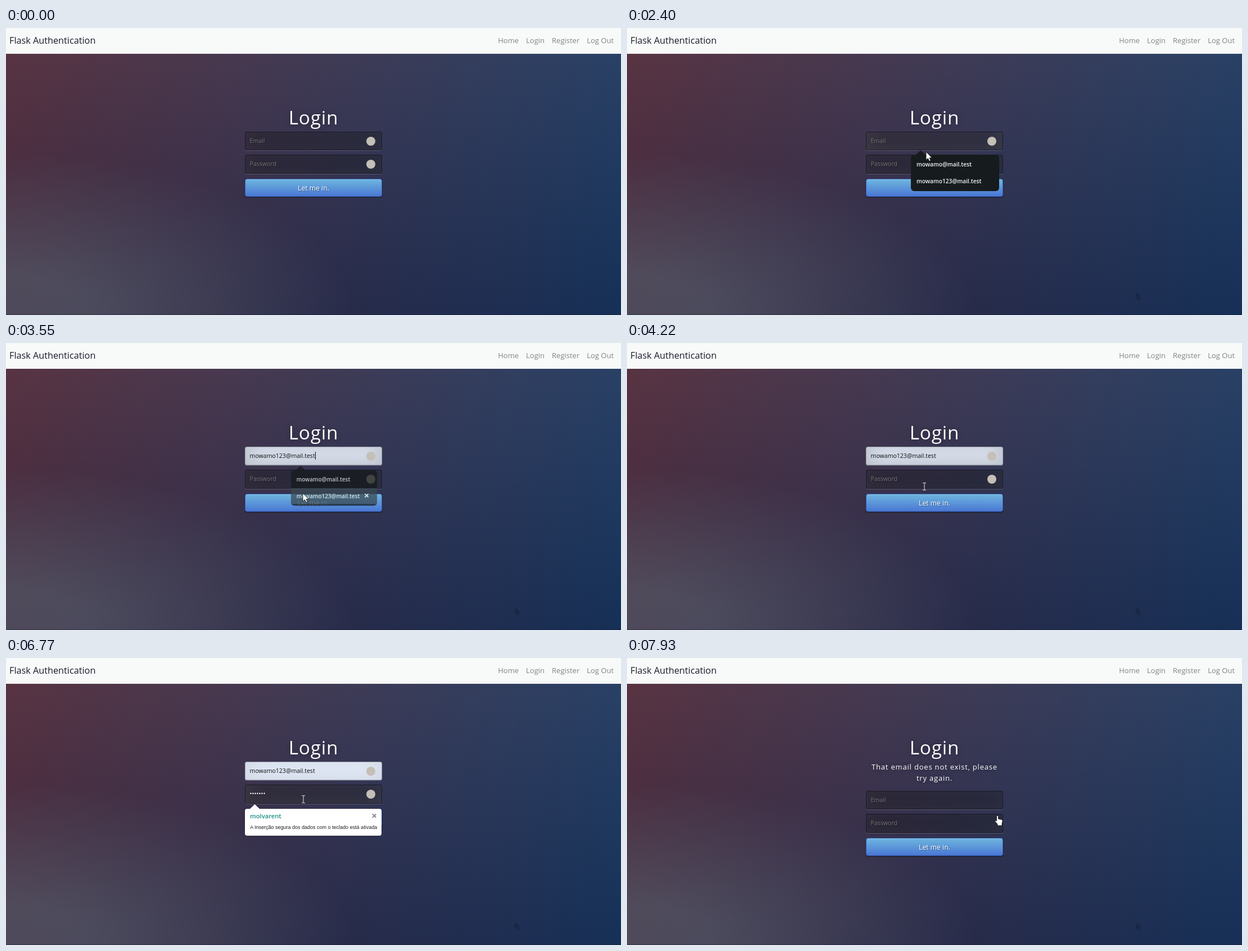
Recreate the animation shown at these times as an HTML page. Size 1094x512 px, loop 8000 ms.

```html
<!DOCTYPE html>
<html lang="en">
<head>
<meta charset="utf-8">
<title>Login</title>
<style>
  html, body { margin: 0; width: 100%; height: 100%; overflow: hidden; }
  * { box-sizing: border-box; }
  body {
    position: relative;
    font-family: "Open Sans", sans-serif;
    white-space: nowrap;
    background:
      radial-gradient(ellipse farthest-corner at 0 100%, rgba(104,128,138,.4) 10%, rgba(138,114,76,0) 40%),
      linear-gradient(to bottom, rgba(57,173,219,.25), rgba(42,60,87,.4)),
      linear-gradient(135deg, #670d10, #092756);
  }
  body > *, #form > *, .popup > * { position: absolute; }
  nav {
    left: 0; top: 0; width: 100%; height: 45.5px; padding: 0 13px 0 6px;
    display: flex; gap: 13px; background: #f8faf9;
    font-size: 13px; line-height: 45px; color: #828384;
  }
  nav b { flex: 1; font-weight: 400; font-size: 16.25px; line-height: 44px; color: #191b2b; }
  #edge { left: 0; bottom: 0; width: 100%; height: 1.5px; background: rgba(10,15,35,.35); }
  #ghost {
    left: 905px; top: 473px; width: 8px; height: 13px; border-radius: 50%;
    background: rgba(15,25,45,.35); transform: rotate(-25deg);
  }
  h1 {
    left: 425px; top: 139px; width: 244px; margin: 0; text-align: center;
    font-weight: 400; font-size: 33.3px; line-height: 40px; letter-spacing: .8px;
    color: #fff; text-shadow: 0 0 8px rgba(0,0,0,.3);
  }
  #error {
    left: 425px; top: 185px; width: 244px; text-align: center; white-space: normal;
    font-size: 13px; line-height: 19.5px; letter-spacing: .81px;
    color: #fff; text-shadow: 0 0 8px rgba(0,0,0,.3);
  }
  #form { left: 425px; width: 244px; }
  .field {
    left: 0; width: 244px; height: 33.5px; padding-left: 7.6px;
    border: 1px solid rgba(0,0,0,.3); border-radius: 3.5px;
    font-size: 10.56px; line-height: 31.5px; color: #fff;
    text-shadow: 1px 1px 1px rgba(0,0,0,.3);
    background: rgba(0,0,0,.3);
  }
  .field.filled { background: #e8f0fe; color: #111; text-shadow: none; }
  .hint { color: #757575; }
  .caret {
    display: inline-block; width: 1px; height: 14px; margin-right: -1px;
    vertical-align: -3px; background: currentColor;
  }
  .key {
    position: absolute; right: 11px; top: 8px; width: 16px; height: 16px;
    border-radius: 50%; background: #c4bfb7;
  }
  #button {
    top: 84px; width: 244px; height: 32.5px; text-align: center;
    border: 1px solid #3762bc; border-radius: 4px;
    font-size: 12.19px; line-height: 31px; color: #fff;
    text-shadow: 1px 1px 1px rgba(0,0,0,.4);
    background: #4a77d4 linear-gradient(#6eb6de, #4a77d4) no-repeat;
    box-shadow: inset 0 1px 0 rgba(255,255,255,.2), 0 1px 2px rgba(0,0,0,.5);
  }
  .popup::before {
    content: ""; position: absolute; top: -8px; width: 19px; height: 9px;
    background: inherit; clip-path: polygon(50% 0, 100% 100%, 0 100%);
  }
  #suggest {
    left: 505px; top: 226px; width: 157px; height: 65px; border-radius: 6px;
    background: #161b1d; color: #f2f4f4; font-weight: 600; font-size: 10.2px; line-height: 29px;
    transform-origin: 50% 50%;
  }
  #suggest::before { left: 8px; }
  #suggest div { left: 0; width: 100%; padding-left: 10px; }
  #suggest .hover { background: #3a4a52; }
  .cross::before, .cross::after {
    content: ""; position: absolute; left: 3.2px; width: 1.5px; height: 9px;
    background: currentColor; transform: rotate(45deg);
  }
  .cross::after { transform: rotate(-45deg); }
  #suggest .cross { left: 134px; top: 42px; }
  #notice {
    left: 425px; top: 269px; width: 242.5px; height: 48px; border-radius: 4px;
    background: #fff; box-shadow: 0 0 2px rgba(0,0,0,.5);
  }
  #notice::before { left: 8px; }
  #notice b { left: 9px; top: 4px; font-size: 11.2px; line-height: 18px; font-weight: 600; color: #159082; }
  #notice .cross { left: 226px; top: 7.5px; color: #8a8a8a; }
  #notice p {
    left: 9px; top: 26px; margin: 0; color: #1d1d25;
    font: 9px/14px "Liberation Sans", Arial, sans-serif;
  }
  #cursor { left: 0; top: 0; width: 30px; height: 30px; overflow: visible; }
</style>
</head>
<body>
  <nav><b>Flask Authentication</b><span>Home</span><span>Login</span><span>Register</span><span>Log Out</span></nav>
  <div id="edge"></div>
  <div id="ghost"></div>
  <h1>Login</h1>
  <div id="error">That email does not exist, please try again.</div>
  <div id="form">
    <div class="field" id="email" style="top:0"><span class="value"></span><i class="caret"></i><span class="hint">Email</span><i class="key"></i></div>
    <div class="field" id="password" style="top:41.7px"><span class="value"></span><i class="caret"></i><span class="hint">Password</span><i class="key"></i></div>
    <div id="button">Let me in.</div>
  </div>
  <div class="popup" id="suggest">
    <div style="top:3px">mowamo@mail.test</div>
    <div style="top:33px" id="choice">mowamo123@mail.test</div>
    <i class="cross"></i>
  </div>
  <div class="popup" id="notice">
    <b>molvarent</b><i class="cross"></i>
    <p>A Inserção segura dos dados com o teclado está ativada</p>
  </div>
  <svg id="cursor">
    <path id="arrow" d="M0 0V14.5L3.4 11.4L5.7 16.6L8.2 15.5L6 10.4H10.6Z" fill="#fff" stroke="#111" stroke-width=".8"/>
    <path id="beam" d="M-3 -6.5H-1L0 -5.7L1 -6.5H3M0 -5.7V5.7M-3 6.5H-1L0 5.7L1 6.5H3" fill="none" stroke="#d8d8dc" stroke-width="1.1"/>
    <path id="hand" d="M-1.5 1.2Q0 -1 1.5 1.2V6L8 7.5Q9.3 8 9 10.5L8 14.5V18H0V15.5L-4.2 10.4Q-4.3 8.3 -2.6 9L-1.5 10Z" fill="#fff" stroke="#111" stroke-width=".8"/>
  </svg>
<script>
const LOOP = 8000, SUBMIT = 7860;
const $ = id => document.getElementById(id);
const show = (el, on) => { el.style.display = on ? "" : "none"; };
const between = (t, a, b) => t >= a && t < b;
const ramp = (t, a, b) => Math.min(1, Math.max(0, (t - a) / (b - a)));

// time, x, y of the pointer's hot spot
const path = [
  [180, 990, 514], [950, 665, 388], [1020, 665, 388], [1420, 525, 204],
  [1480, 525, 204], [1580, 525, 202], [1720, 525, 202], [2120, 532, 218],
  [2330, 532, 218], [2830, 528, 268], [3650, 528, 268], [4090, 529, 256],
  [4220, 529, 256], [4500, 529, 252], [7030, 529, 252], [7450, 655, 279],
  [7600, 655, 279], [7790, 659, 281]
];
const keyTimes = [5320, 5420, 5520, 5640, 5910, 6050, 6240];

function pointerAt(t) {
  const next = path.findIndex(p => p[0] > t);
  if (next < 0) return path[path.length - 1].slice(1);
  if (next === 0) return path[0].slice(1);
  const [t0, x0, y0] = path[next - 1], [t1, x1, y1] = path[next];
  const u = ramp(t, t0, t1), s = u * u * (3 - 2 * u);
  return [x0 + (x1 - x0) * s, y0 + (y1 - y0) * s];
}

function pointerKind(t, x, y) {
  if (t > 7430) return "hand";
  if (between(t, 1980, 3700)) return "arrow";
  const inForm = x > 425 && x < 669;
  if (inForm && (between(y, 185, 218) || between(y, 226, 260))) return "beam";
  return inForm && t < 2000 && between(y, 268, 301) ? "hand" : "arrow";
}

function drawField(id, text, focus, caret, keyIcon) {
  const field = $(id);
  field.querySelector(".value").textContent = text;
  show(field.querySelector(".hint"), !text);
  show(field.querySelector(".caret"), caret);
  show(field.querySelector(".key"), keyIcon);
  field.style.boxShadow =
    `inset 0 -4px 36.5px rgba(100,100,100,${.2 + .2 * focus}), 0 1px 1px rgba(255,255,255,.2)`;
}

function render(t) {
  const failed = t >= SUBMIT;
  const [x, y] = pointerAt(t), kind = pointerKind(t, x, y);

  show($("ghost"), t > 450);
  show($("error"), failed);
  $("form").style.top = (failed ? 236.7 : 184.5) + "px";

  const filled = between(t, 2720, SUBMIT);
  const switched = ramp(t, 4220, 4700);
  $("email").classList.toggle("filled", filled);
  drawField("email", filled ? "mowamo123@mail.test" : "",
    failed ? 0 : ramp(t, 1720, 2200) - switched,
    between(t, 1720, 2330) || between(t, 3400, 4060), !failed);

  const typed = failed ? 0 : keyTimes.filter(k => t >= k).length;
  drawField("password", "•".repeat(typed), failed ? 0 : switched, between(t, 5320, 6770), !failed);

  const hovered = !failed && (t > 7600 || (kind === "hand" && t < 2000));
  $("button").style.backgroundPosition = hovered ? "0 -12px" : "0 0";

  const suggest = ramp(t, 1860, 2060) - ramp(t, 3480, 3760);
  $("suggest").style.opacity = suggest;
  $("suggest").style.transform = `scale(${.9 + .1 * suggest})`;
  $("choice").classList.toggle("hover", filled);
  show($("suggest").querySelector(".cross"), filled);

  $("notice").style.opacity = ramp(t, 4500, 4800) - ramp(t, 7540, 7680);

  show($("cursor"), t >= 180);
  $("cursor").style.transform = `translate(${Math.round(x)}px, ${Math.round(y)}px)`;
  for (const name of ["arrow", "beam", "hand"]) show($(name), name === kind);
}

const start = performance.now();
function tick() {
  render((performance.now() - start) % LOOP);
  requestAnimationFrame(tick);
}
tick();
</script>
</body>
</html>
```
